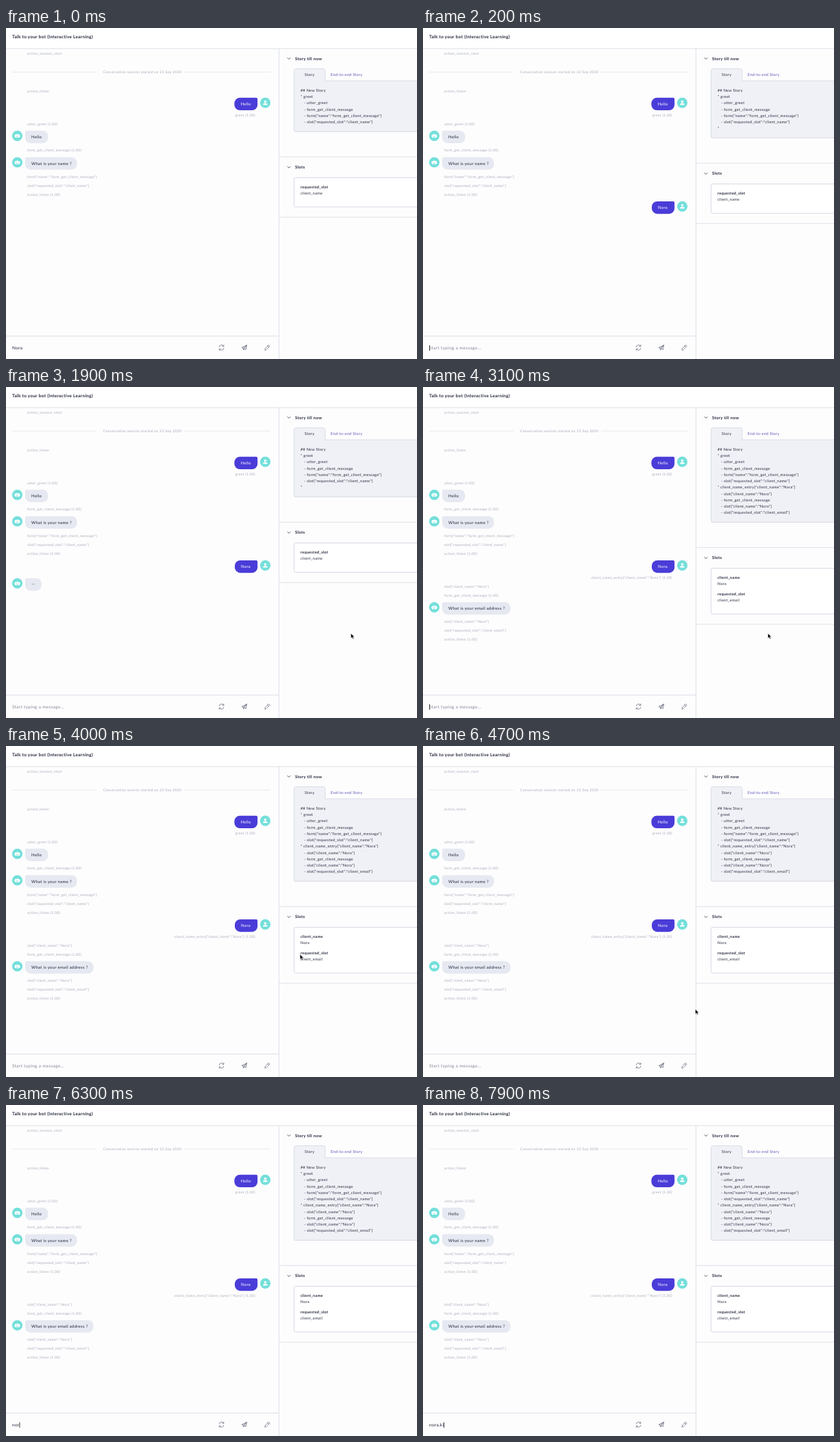
These frames come from a looping animation (600 px wide and 483 px high, 8 s). An HTML page:

```html
<!DOCTYPE html>
<html lang="en">
<head>
<meta charset="utf-8">
<title>Talk to your bot</title>
<style>
html, body { margin: 0; width: 100%; height: 100%; overflow: hidden; background: #fdfdfe; }
svg { display: block; width: 600px; height: 483px; }
text { font: 5.55px Lato, sans-serif; letter-spacing: .28px; fill: #22263a; white-space: pre; text-rendering: geometricPrecision; }
.title { font-size: 6.47px; font-weight: 700; }
.head { font-size: 6px; font-weight: 700; }
.bold { font-weight: 700; }
.msg { font-size: 6px; }
.note { font-size: 5.09px; letter-spacing: .31px; fill: #a4a8b5; }
.input { font-size: 6.47px; letter-spacing: .31px; }
.hint { fill: #858995; }
.tab { fill: #5a52b5; }
.white { fill: #fff; }
.end { text-anchor: end; }
.line { stroke: #dfe1e8; fill: none; }
.icon { stroke: #686d7c; stroke-width: .75; fill: none; stroke-linejoin: round; stroke-linecap: round; }
</style>
</head>
<body>
<svg id="stage" viewBox="0 0 600 483"></svg>
<script>
const stage = document.getElementById('stage');
const LOOP = 8000, NAME = 'Nora', EMAIL = 'nora.ki';
const SENT = 100, TRACKED = 200, WAITING = 400, REPLIED = 3000;
const KEYS = [5800, 5900, 6200, 6800, 7100, 7100, 7900];
// Pointer way points: time, x, y
const MOVES = [
  [[800, 535, 426], [900, 516, 410], [1000, 502, 400], [1100, 494, 395.5], [1300, 501, 384],
   [1600, 517, 360], [1900, 503.5, 359.5], [3500, 503.5, 359.5], [3800, 455, 322], [4000, 429.2, 304],
   [4300, 450, 318], [4500, 470, 340], [4900, 325, 428], [5200, 217, 450.5], [5800, 217, 450.5]]
][0];

// y is the middle of the capitals
const text = (x, y, str, cls = '') => `<text x="${x}" y="${y + 2}" class="${cls}">${str}</text>`;
const path = (d, cls, extra = '') => `<path d="${d}" class="${cls}" ${extra}/>`;
const note = (y, str) => text(31, y, str, 'note');
const noteEnd = (y, str) => text(364, y, str, 'note end');

function bubble(x, y, w, h, fill, r) {
  const [tl, tr] = r;
  return `<path fill="${fill}" d="M${x + tl} ${y}h${w - tl - tr}a${tr} ${tr} 0 0 1 ${tr} ${tr}v${h - tr - 8}
    a8 8 0 0 1 -8 8h${16 - w}a8 8 0 0 1 -8 -8v${8 + 0 - h + tl}a${tl} ${tl} 0 0 1 ${tl} ${-tl}z"/>`;
}

function bot(y, w, str) {
  return `<circle cx="16.5" cy="${y - 1.5}" r="7.6" fill="#74dfda"/>
    <g transform="translate(16.5 ${y - 1.5})">
      <path fill="#fff" d="M-2.6 -2h2.2v-1h.8v1h2.2q.9 0 .9 .9v.4h.6v2.2h-.6v.3q0 .9 -.9 .9h-5.2q-.9 0 -.9 -.9v-.3h-.6v-2.2h.6v-.4q0 -.9 .9 -.9z"/>
      <path stroke="#74dfda" stroke-width=".8" d="M-1.9 -.2h.9M1 -.2h.9M-1.4 1.4h2.8"/>
    </g>` + bubble(28, y - 9, w, 18.2, '#e6e9f1', [2, 8]) + text(37, y + .2, str, 'msg');
}

function user(y, x, str) {
  return bubble(x, y - 9, 367.2 - x, 18.2, '#4a3cd8', [8, 2]) + text(x + 9, y + .2, str, 'msg white') +
    `<circle cx="378.5" cy="${y - 1.7}" r="7.6" fill="#74dfda"/>
    <g fill="#fff" transform="translate(378.5 ${y - 1.7})"><circle cy="-1.6" r="1.8"/>
    <path d="M-3.2 3.2v-.7q0 -1.8 1.8 -1.8h2.8q1.8 0 1.8 1.8v.7z"/></g>`;
}

const section = (y, str) => path(`M411 ${y - 1}l2 2 2 -2`, 'icon', 'style="stroke:#22263a"') + text(422, y, str, 'head');

function chat(t) {
  let s = note(36.5, 'action_session_start') +
    path('M9 64.3H132M260 64.3H386', 'line', 'stroke-width=".7"') +
    text(142, 64, 'Conversation session started on 23 Sep 2020', 'note') +
    note(92, 'action_listen') + user(110.8, 333.4, 'Hello') + noteEnd(127, 'greet (1.00)') +
    note(140, 'utter_greet (1.00)') + bot(158.8, 33.5, 'Hello') +
    note(178.3, 'form_get_client_message (1.00)') + bot(197.5, 75.7, 'What is your name ?') +
    note(217, 'form{"name":"form_get_client_message"}') +
    note(230, 'slot{"requested_slot":"client_name"}') + note(243, 'action_listen (1.00)');
  if (t >= SENT) s += user(262, 334, NAME);
  if (t >= REPLIED) {
    s += noteEnd(278, `client_name_entry{"client_name":"${NAME}"} (1.00)`) +
      note(290.6, `slot{"client_name":"${NAME}"}`) + note(303.6, 'form_get_client_message (1.00)') +
      bot(323, 99.7, 'What is your email address ?') + note(342.2, `slot{"client_name":"${NAME}"}`) +
      note(355.2, 'slot{"requested_slot":"client_email"}') + note(368.2, 'action_listen (1.00)');
  } else if (t >= WAITING) {
    s += bot(288, 24, '');
    const dots = [0, 1, 3][Math.floor((t - WAITING) / 600) % 3];
    for (let i = 0; i < dots; i++) s += `<circle cx="${38.3 + i * 1.7}" cy="287.8" r=".5" fill="#6d7385"/>`;
  }
  return s;
}

function panel(t) {
  const done = t >= REPLIED;
  const story = ['## New Story', '* greet', '- utter_greet', '- form_get_client_message',
    '- form{"name":"form_get_client_message"}', '- slot{"requested_slot":"client_name"}'];
  if (done) story.push(`* client_name_entry{"client_name":"${NAME}"}`, `- slot{"client_name":"${NAME}"}`,
    '- form_get_client_message', `- slot{"client_name":"${NAME}"}`, '- slot{"requested_slot":"client_email"}');
  else if (t >= TRACKED) story.push('*');
  const slots = done ? [['client_name', NAME], ['requested_slot', 'client_email']] : [['requested_slot', 'client_name']];
  const dy = (story.length - 6) * 9.25, top = 218.3 + dy, tall = 19 + slots.length * 23.8;
  const end = top + tall + 15;
  return section(44.5, 'Story till now') +
    `<rect x="420.5" y="77" width="200" height="${74 + dy}" rx="2" fill="#d3d5e0" opacity=".5" transform="translate(0 .8)"/>
    <rect x="420.5" y="77" width="200" height="${74 + dy}" rx="2" fill="#f0f1f6" stroke="#d3d6e1" stroke-width=".8"/>
    <path d="M420.5 79V62.5q0 -3 3 -3h39.5q3 0 3 3V77" fill="#f0f1f6" stroke="#d3d6e1" stroke-width=".8"/>
    <path d="M421 78.5V76.4H465.6V78.5z" fill="#f0f1f6"/>` +
    text(436, 68.2, 'Story') + text(474, 68.2, 'End-to-end Story', 'tab') +
    story.map((str, i) => text(str[0] == '-' ? 435.2 : 430, 90.8 + i * 9.25, str)).join('') +
    path(`M398 ${188 + dy}H600M398 ${end}H600`, 'line') + section(203.2 + dy, 'Slots') +
    `<rect x="420.5" y="${top}" width="200" height="${tall}" rx="2" fill="#fff" stroke="#d3d6e1" stroke-width=".9"/>` +
    slots.map(([key, val], i) => text(430, top + 13.6 + i * 23.8, key, 'bold') + text(430, top + 22.8 + i * 23.8, val)).join('');
}

function footer(t) {
  const typed = KEYS.filter(k => k <= t).length;
  const str = t < SENT ? NAME : EMAIL.slice(0, typed);
  const since = typed ? t - KEYS[typed - 1] : t - SENT;
  const caret = t >= SENT && since % 1000 < 500;
  return path('M0 449.5H398', 'line') +
    `<text id="field" x="9" y="468.7" class="input ${str ? '' : 'hint'}">${str || 'Start typing a message...'}</text>` +
    (caret ? `<rect id="caret" x="9.2" y="463" width=".8" height="8" fill="#111"/>` : '') +
    path('M311.3 465.5a3.4 3.4 0 0 1 6.3 -1.3M317.9 462.4v2h-2M317.9 467.2a3.4 3.4 0 0 1 -6.3 1.3M311.3 470.3v-2h2', 'icon') +
    path('M344.3 466.3l7.2 -3.6 -1.2 6.6 -2.5 -1.2 -1.4 1.9v-2.7zM346.4 467.3l5.1 -4.6 -3.7 5.4', 'icon') +
    path('M377.9 469.8l.6 -2.5 4.3 -4.3q.7 -.6 1.4 0l.4 .4q.6 .7 0 1.4l-4.3 4.3zM381.9 463.9l1.8 1.8', 'icon');
}

function pointer(t) {
  const i = MOVES.findIndex(m => m[0] > t);
  if (i < 1) return '';
  const [t0, x0, y0] = MOVES[i - 1], [t1, x1, y1] = MOVES[i];
  const k = (t - t0) / (t1 - t0);
  return `<path transform="translate(${x0 + (x1 - x0) * k} ${y0 + (y1 - y0) * k})" fill="#000" stroke="#fff"
    stroke-width=".5" d="M0 0V7.2L1.7 5.7 2.9 8.3 4.1 7.8 3 5.2H5.2z"/>`;
}

function draw(t) {
  stage.innerHTML = '<rect width="600" height="483" fill="#fdfdfe"/>' + chat(t) + panel(t) +
    path('M398.5 30V483', 'line') +
    '<rect width="600" height="29.5" fill="#fff"/><rect y="29.5" width="600" height="1.2" fill="#e3e5ea"/>' +
    text(9, 13.2, 'Talk to your bot (Interactive Learning)', 'title') + footer(t) + pointer(t);
  const caret = document.getElementById('caret');
  if (caret && t >= KEYS[0]) caret.setAttribute('x', 9 + document.getElementById('field').getComputedTextLength());
}

let last = -1;
function tick() {
  const t = Math.floor(performance.now() % LOOP / 100) * 100;
  if (t !== last) draw(last = t);
  requestAnimationFrame(tick);
}
tick();
</script>
</body>
</html>
```
